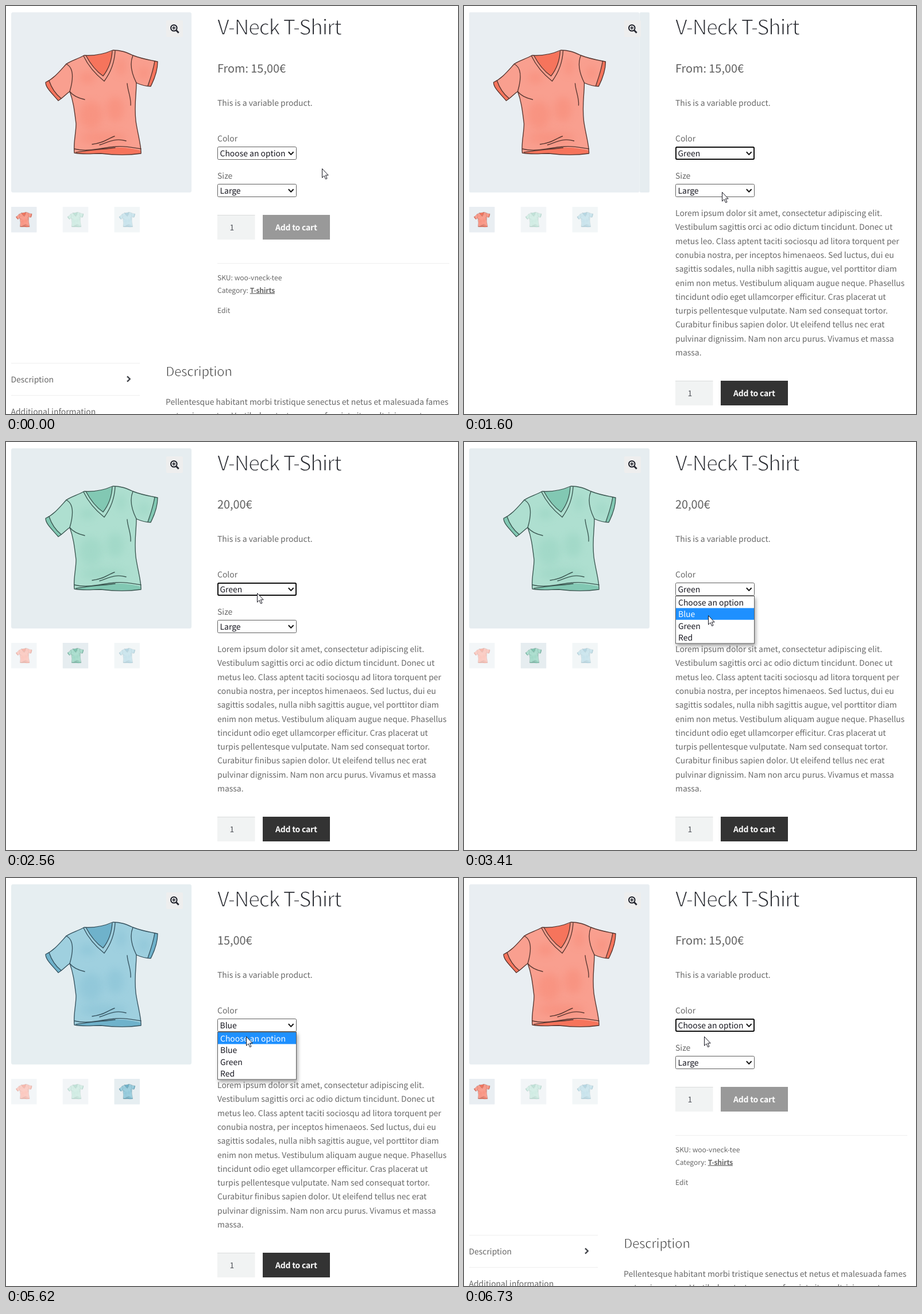
An HTML page for the animation above (6.96 s loop, 787 by 711 pixels).

```html
<!DOCTYPE html>
<html lang="en">
<head>
<meta charset="utf-8">
<title>Variable product</title>
<style>
html, body { margin: 0; width: 100%; height: 100%; overflow: hidden; background: #fff; }
svg { display: block; }
text {
  font: 13.94px "Noto Sans CJK SC", "Noto Sans CJK JP", "Noto Sans CJK", "Open Sans", sans-serif;
  fill: #686868; text-rendering: geometricPrecision; white-space: pre;
}
.title { font-size: 36.2px; font-weight: 300; fill: #2b2d33; letter-spacing: -.0225em; }
.head { font-size: 22.5px; font-weight: 300; fill: #333; }
.thin { font-weight: 400; stroke: #fff; stroke-width: .035em; }
.title.thin { letter-spacing: -.043em; }
.head.thin { letter-spacing: -.02em; }
.price { font-size: 19.85px; fill: #606060; }
.small { font-size: 12.1px; }
.bold { font-weight: 600; letter-spacing: -.015em; }
.dark { fill: #16161f; }
.rule { stroke: #eee; }
.box { fill: #fff; stroke: #5f5f5f; }
.focus { fill: none; stroke: #101010; stroke-width: 2; }
.arrow { fill: none; stroke: #111; stroke-width: 2; }
.list { filter: drop-shadow(2px 4px 3px rgba(0, 0, 0, .35)); }
.body { fill: var(--body); }
.deep { fill: var(--deep); }
.blot { fill: var(--deep); opacity: .26; filter: blur(7px); }
.ink { fill: none; stroke: var(--ink); stroke-width: 1.35; stroke-linecap: round; stroke-linejoin: round; }
.red { --bg: #e9eef2; --body: #f99f8f; --deep: #f6745c; --ink: #56352f; }
.green { --bg: #e6edf0; --body: #aedfd0; --deep: #82c8b3; --ink: #3a5650; }
.blue { --bg: #e6eef1; --body: #9fd0df; --deep: #6fb2cb; --ink: #35525f; }
</style>
</head>
<body>
<svg width="787" height="711" viewBox="0 0 787 711">
  <defs>
    <clipPath id="view"><rect x="9" y="11" width="314" height="314" rx="2"/></clipPath>
    <clipPath id="fold"><rect id="foldBox" x="360" y="348" width="427" height="0"/></clipPath>
    <path id="shirt" d="M136 86C126 92 114 95 105 101C94 113 84 126 69 133C69 143 81 153 91 165C98 161 104 154 111 149C117 165 119 180 122 205C122 222 117 238 119 256C135 259 150 257 165 257C190 260 215 260 235 257C236 245 229 222 226 200C223 172 227 155 227 134C236 138 244 140 252 140C258 128 264 112 264 97C249 94 236 92 221 86C208 80 200 77 186 77C170 84 152 87 136 86Z"/>
    <g id="panel">
      <rect x="9" y="11" width="314" height="314" rx="3" style="fill:var(--bg)"/>
      <use href="#shirt" class="body"/>
      <ellipse class="blot" cx="148" cy="190" rx="20" ry="24"/>
      <ellipse class="blot" cx="190" cy="180" rx="15" ry="22"/>
      <ellipse class="blot" cx="200" cy="105" rx="8" ry="16"/>
      <ellipse class="blot" cx="142" cy="125" rx="14" ry="10"/>
      <ellipse class="blot" cx="170" cy="230" rx="40" ry="10"/>
      <ellipse class="blot" cx="240" cy="117" rx="9" ry="12"/>
      <path class="deep" d="M139 86C155 88 170 83 185 79C184 98 177 112 169 122C156 113 147 101 139 86ZM121 256C145 250 165 248 190 247C210 246 225 250 235 252L234 257C210 260 190 258 168 257C150 258 135 258 121 256ZM69 133L75 130C80 145 87 154 96 161L91 165C81 153 69 143 69 133ZM264 97L259 96C256 114 251 127 247 139L252 140C258 128 264 112 264 97Z"/>
      <use href="#shirt" class="ink"/>
      <path class="ink" d="M135 87C143 104 156 119 171 131C182 116 189 98 190 78M139 86C147 101 156 113 169 122C177 112 184 98 185 78M105 101C117 107 118 125 111 149C118 158 128 161 137 163M221 86C215 100 219 118 227 134M75 130C80 145 87 154 96 161M259 96C256 114 251 127 247 139M211 135C212 149 218 159 217 173M119 249C145 255 165 247 190 245C207 243 222 247 235 249M122 255C150 250 168 250 190 247M150 241C170 239 177 231 189 227M163 242C181 236 190 230 209 235"/>
    </g>
    <path id="caret" class="arrow" d="M491.8 254.3l4.4 4.6 4.4-4.6"/>
  </defs>

  <rect width="787" height="711" fill="#fff"/>
  <g clip-path="url(#view)"><g id="strip"></g></g>
  <g id="thumbs"></g>
  <rect x="279" y="25" width="29" height="29" rx="2" fill="#eee"/>
  <g fill="none" stroke="#24262f" stroke-width="2">
    <circle cx="292.3" cy="38.3" r="5.3"/>
    <path d="M296.5 42.5l4.2 4.2" stroke-width="2.8"/>
    <path d="M289.3 38.3h6M292.3 35.3v6" stroke-width="1.6"/>
  </g>

  <text class="title" x="368" y="49.5">V-Neck T-Shirt</text>
  <text class="price" id="price" x="368" y="115.5"></text>
  <text x="368" y="174">This is a variable product.</text>
  <text x="368" y="236">Color</text>
  <text x="368" y="301">Size</text>
  <rect class="box" x="368.5" y="245.5" width="137" height="22" rx="2"/>
  <rect id="focus" class="focus" x="369" y="246" width="136" height="21" rx="2"/>
  <text class="dark" id="picked" x="372.5" y="262"></text>
  <use href="#caret"/>
  <rect class="box" x="368.5" y="310.5" width="137" height="22" rx="2"/>
  <text class="dark" x="372.5" y="327">Large</text>
  <use href="#caret" y="65"/>

  <g id="lorem" clip-path="url(#fold)"></g>

  <g id="below">
    <rect x="368" y="364" width="65.5" height="43" fill="#f1f3f3"/>
    <path d="M368 364.5h65.5" stroke="#dadcdc"/>
    <text x="389.5" y="390.5" style="fill:#50535a">1</text>
    <rect id="button" x="447" y="364" width="117" height="43"/>
    <text class="bold" x="469" y="390.5" style="fill:#fff">Add to cart</text>
    <path class="rule" d="M368 448.5h404M9 622.5h224M9 678.5h224"/>
    <text class="small" x="368" y="478">SKU: woo-vneck-tee</text>
    <text class="small" x="368" y="499.5">Category: <tspan class="bold" text-decoration="underline">T-shirts</tspan></text>
    <text class="small" x="368" y="534.5">Edit</text>
    <text x="8.5" y="655.5">Description</text>
    <path d="M211 645.3l4.7 4.7-4.7 4.7" fill="none" stroke="#43454b" stroke-width="2.4"/>
    <text x="8.5" y="711.5">Additional information</text>
    <text class="head" x="278" y="645">Description</text>
    <text x="278" y="694.5">Pellentesque habitant morbi tristique senectus et netus et malesuada fames</text>
    <text x="278" y="718.8">ac turpis egestas. Vestibulum tortor quam, feugiat vitae, ultricies eget,</text>
  </g>

  <g id="list" class="list">
    <rect class="box" x="368.5" y="268.5" width="137" height="82.5"/>
    <rect id="mark" x="369" width="136" height="20.4" fill="#1e90ff"/>
  </g>
  <path id="cursor" d="M.5 .5V16.2L4 12.8L6.6 18.6L9 17.6L6.4 11.9H11.2Z" fill="#fff" stroke="#15151f"/>
  <circle id="ring" r="11.8" fill="#ff0" fill-opacity=".47"/>
</svg>

<script>
const LOOP = 6960, WIDTH = 314, ROW = 20.4, LIST_TOP = 269, GROW = 289;
const COLORS = ['red', 'green', 'blue'];
const OPTIONS = ['Choose an option', 'Blue', 'Green', 'Red'];
const LINES = [
  'Lorem ipsum dolor sit amet, consectetur adipiscing elit.',
  'Vestibulum sagittis orci ac odio dictum tincidunt. Donec ut',
  'metus leo. Class aptent taciti sociosqu ad litora torquent per',
  'conubia nostra, per inceptos himenaeos. Sed luctus, dui eu',
  'sagittis sodales, nulla nibh sagittis augue, vel porttitor diam',
  'enim non metus. Vestibulum aliquam augue neque. Phasellus',
  'tincidunt odio eget ullamcorper efficitur. Cras placerat ut',
  'turpis pellentesque vulputate. Nam sed consequat tortor.',
  'Curabitur finibus sapien dolor. Ut eleifend tellus nec erat',
  'pulvinar dignissim. Nam non arcu purus. Vivamus et massa',
  'massa.'
];

// Redraw bursts: first and last change, number of changes
const BURSTS = [
  [80, 570, 7], [740, 1200, 7], [1450, 1450, 1], [1600, 2080, 7], [2320, 2940, 9],
  [3090, 3410, 5], [3710, 4350, 9], [4580, 4890, 5], [5050, 5120, 2],
  [5360, 5620, 4], [6010, 6010, 1], [6170, 6730, 8]
];
// Cursor moves: start, end, target x, target y
const MOVES = [
  [0, 400, 446, 253], [660, 1200, 449, 324], [2240, 2720, 435, 254], [3010, 3410, 425, 302],
  [4500, 4890, 418, 260], [5280, 5620, 418, 276]
];
const CLICKS = [[480, 565], [1450, 1600], [2860, 2935], [3710, 3790], [5050, 5120], [6010, 6170]];
const OPENED = [[565, 1600], [2935, 3790], [5120, 6170]];
const STATES = [
  { at: 0, slide: -999, option: 0, image: 0, price: 'From: 15,00€' },
  { at: 1600, slide: 1515, option: 2, image: 1, price: '20,00€' },
  { at: 3790, slide: 3683, option: 1, image: 2, price: '15,00€' },
  { at: 6170, slide: 6110, option: 0, image: 0, price: 'From: 15,00€' }
];

const $ = id => document.getElementById(id);
const add = (parent, tag, attrs, text = '') => {
  const el = document.createElementNS('http://www.w3.org/2000/svg', tag);
  for (const key in attrs) el.setAttribute(key, attrs[key]);
  el.textContent = text;
  return parent.appendChild(el);
};
const show = (id, on) => { $(id).style.display = on ? '' : 'none'; };
const clamp = v => Math.max(0, Math.min(1, v));
const mix = (a, b, k) => a + (b - a) * k;
const swing = v => .5 - Math.cos(Math.PI * clamp(v)) / 2;
const within = (spans, t) => spans.some(([a, b]) => t >= a - .01 && t < b - .01);

COLORS.forEach((name, i) => add($('strip'), 'use', { href: '#panel', class: name, x: i * WIDTH }));
const thumbs = COLORS.map((name, i) => add($('thumbs'), 'use', {
  href: '#panel', class: name,
  transform: `translate(${9 + i * 89.75} 350) scale(.1417) translate(-9 -11)`
}));
LINES.forEach((line, i) => add($('lorem'), 'text', { x: 368, y: 366 + i * 24.3 }, line));
const rows = OPTIONS.map((name, i) =>
  add($('list'), 'text', { x: 373, y: 284.7 + i * ROW, class: 'dark' }, name));

// Without a light face, thin the regular one
const heads = document.querySelectorAll('.title, .head');
const widthAt = weight => {
  heads[0].style.fontWeight = weight;
  return heads[0].getComputedTextLength();
};
if (Math.abs(widthAt(300) - widthAt(400)) < .5) heads.forEach(el => el.classList.add('thin'));
heads[0].style.fontWeight = '';

function snap(t) {
  let shown = 0;
  for (const [from, to, count] of BURSTS) {
    if (t < from) break;
    const step = (to - from) / (count - 1) || 1;
    shown = from + Math.min(count - 1, Math.floor((t - from) / step + 1e-6)) * step;
  }
  return shown;
}

function pointer(t) {
  let x = 550, y = 283;
  for (const [from, to, tx, ty] of MOVES) {
    const k = 1 - (1 - clamp((t - from) / (to - from))) ** 2;
    x = mix(x, tx, k);
    y = mix(y, ty, k);
  }
  return [x, y];
}

function draw(t) {
  const now = STATES.findLastIndex(s => t >= s.at - .01);
  const state = STATES[now], prev = STATES[Math.max(0, now - 1)];
  const [x, y] = pointer(t);

  const pos = mix(prev.image, state.image, swing((t - state.slide) / 560));
  $('strip').setAttribute('transform', `translate(${-pos * WIDTH} 0)`);
  const fade = now ? clamp((t - state.at) / 200) : 1;
  thumbs.forEach((el, i) => {
    const lit = mix(prev.image === i, state.image === i, fade);
    el.style.opacity = .5 + .5 * lit;
  });
  $('price').textContent = (t >= state.at + 79 ? state : prev).price;
  $('picked').textContent = OPTIONS[state.option];

  const grown = state.option ? GROW : now ? GROW * (1 - swing((t - 6120) / 200)) : 0;
  $('foldBox').setAttribute('height', grown);
  $('below').setAttribute('transform', `translate(0 ${grown})`);
  $('button').setAttribute('fill', state.option ? '#333' : '#999');

  const open = within(OPENED, t);
  show('focus', now && !open);
  show('list', open);
  const row = y < LIST_TOP ? state.option : Math.floor((y - LIST_TOP) / ROW);
  $('mark').setAttribute('y', LIST_TOP + row * ROW);
  rows.forEach((el, i) => { el.style.fill = i === row ? '#fff' : ''; });

  $('cursor').setAttribute('transform', `translate(${Math.round(x)} ${Math.round(y)})`);
  $('ring').setAttribute('transform', `translate(${x} ${y})`);
  show('ring', within(CLICKS, t));
}

const start = performance.now();
let last = -1;
function tick() {
  const t = snap((performance.now() - start) % LOOP);
  if (t !== last) draw(last = t);
  requestAnimationFrame(tick);
}
tick();
</script>
</body>
</html>
```
